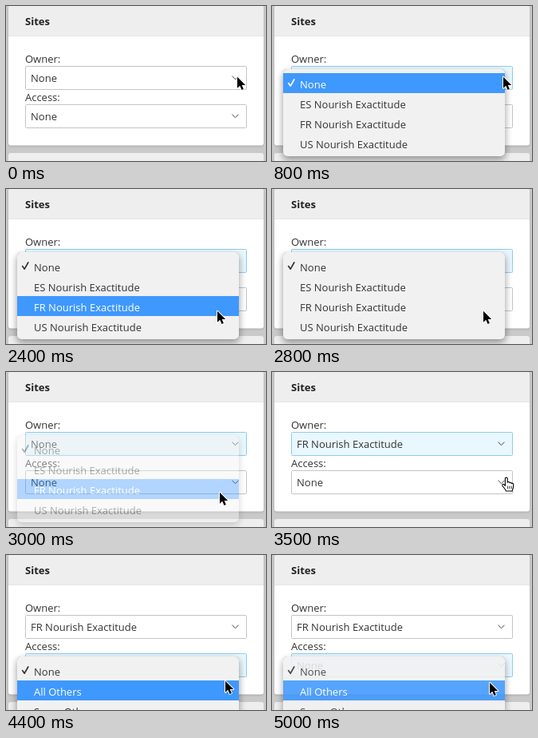
Recreate the animation shown at these times as an HTML page. Size 326 by 194 pixels, loop 5100 ms.

```html
<!DOCTYPE html>
<html lang="en">
<head>
<meta charset="utf-8">
<title>Sites form</title>
<style>
  html, body { margin: 0; width: 100%; height: 100%; overflow: hidden; background: #c9c9c9; }
  svg { display: block; width: 326px; height: 194px; }
  text { font: 13px "Open Sans", "Noto Sans", sans-serif; fill: #333; white-space: pre; }
  .title { font-weight: 700; fill: #222; }
  .chevron, .check { fill: none; stroke: #333; stroke-linecap: round; stroke-linejoin: round; }
  .chevron { stroke: #444; stroke-width: 1; }
  .check { stroke-width: 1.7; }
  .field { fill: #fff; stroke: #c4c4c4; }
  .focus .field { fill: #e9f7fe; stroke: #8fcde8; }
  .row rect { fill: none; }
  .row.on rect { fill: #3f98fd; }
  .row.on text { fill: #fff; }
  .row.on .check { stroke: #fff; }
  .sheet { fill: #f1f1f1; filter: drop-shadow(0 4px 5px rgba(0, 0, 0, .3)) drop-shadow(0 0 .6px rgba(0, 0, 0, .45)); }
  .panel { filter: drop-shadow(0 1px 1px rgba(0, 0, 0, .16)); }
</style>
</head>
<body>
<svg id="stage" viewBox="0 0 326 194">
  <rect width="326" height="194" fill="#c9c9c9"/>
  <rect class="panel" x="3" y="0" width="320" height="174.5" rx="3" fill="#fff"/>
  <path d="M3 37V3a3 3 0 0 1 3-3H320a3 3 0 0 1 3 3V37Z" fill="#eee"/>
  <path d="M3 37.5H323" stroke="#e6e6e6"/>
  <rect x="3" y="184" width="320" height="30" rx="3" fill="#eee"/>
  <text class="title" x="24" y="24">Sites</text>
</svg>
<script>
const LOOP = 5100, STEP = 100, ROW = 25;
const GROUP = "Nourish Exactitude";
const stage = document.getElementById("stage");

function add(parent, tag, attrs, text) {
  const el = document.createElementNS("http://www.w3.org/2000/svg", tag);
  for (const key in attrs) el.setAttribute(key, attrs[key]);
  if (text) el.textContent = text;
  parent.appendChild(el);
  return el;
}

function makeSelect(label, top) {
  const g = add(stage, "g", {});
  add(g, "text", { x: 24, y: top - 4 }, label);
  add(g, "rect", { class: "field", x: 24.5, y: top + .5, width: 277, height: 29, rx: 1 });
  const value = add(g, "text", { x: 31, y: top + 20 }, "None");
  add(g, "path", { class: "chevron", d: `M283.8 ${top + 13}l3.7 3.7l3.7 -3.7` });
  return { g, value };
}

function makeMenu(top, items) {
  const g = add(stage, "g", {});
  add(g, "rect", { class: "sheet", x: 14, y: top, width: 278, height: items.length * ROW + 9, rx: 5 });
  const rows = items.map((item, i) => {
    const y = top + 5 + i * ROW;
    const row = add(g, "g", { class: "row" });
    add(row, "rect", { x: 14, y, width: 278, height: ROW });
    add(row, "text", { x: 35, y: y + 19 }, item);
    if (!i) add(row, "path", { class: "check", d: `M20.6 ${y + 12.6}l2.6 3.6l4.6 -8.2` });
    return row;
  });
  return { g, rows, top };
}

const owner = makeSelect("Owner:", 75);
const access = makeSelect("Access:", 123);
const ownerMenu = makeMenu(79, ["None", "ES " + GROUP, "FR " + GROUP, "US " + GROUP]);
const accessMenu = makeMenu(127, ["None", "All Others", "Some Others"]);

const arrow = add(stage, "path", {
  d: "M0 .8V14.8L3.3 11.7L5.5 16.9L7.9 15.9L5.7 10.9H10.2Z",
  fill: "#000", stroke: "#fff", "stroke-width": 2, "stroke-linejoin": "round", "paint-order": "stroke"
});
const hand = add(stage, "g", {});
add(hand, "path", {
  d: "M-1.6 9V1.6C-1.6 -.4 1.2 -.4 1.2 1.6V6.2C1.6 5 3.8 5.2 3.9 6.8C4.4 5.9 6.3 6.2 6.4 7.6" +
     "C7 6.9 8.7 7.3 8.7 8.8V11.6C8.7 13.4 7.4 14.6 7.2 17H-.6C-1 14.6 -3.6 13 -5 10.4" +
     "C-5.9 8.8 -4.2 7.8 -3 8.9L-1.6 10.4Z",
  fill: "#fff", stroke: "#000", "stroke-width": 1.1, "stroke-linejoin": "round"
});
add(hand, "path", { d: "M1.4 10.6V14.2M3.8 10.6V14.2M6.2 10.6V14.2", stroke: "#000", "stroke-width": .8 });

// time, x, y of the pointer tip
const path = [
  [0, 290, 88], [1800, 290, 88], [1900, 289, 99], [2000, 287, 111], [2100, 281, 127],
  [2200, 273, 142], [2300, 267, 150], [2400, 265, 152], [2900, 265, 152], [3000, 268, 150],
  [3200, 283, 142], [3300, 289, 137], [3400, 292, 134], [3500, 294, 132], [3600, 295, 132],
  [3700, 294, 131], [3800, 293, 131], [4100, 293, 131], [4200, 289, 138], [4300, 281, 149],
  [4400, 275, 157], [4500, 273.5, 158.5], [4600, 273, 159], [LOOP, 273, 159]
];

function pointerAt(t) {
  const i = path.findIndex(p => p[0] > t);
  const [t0, x0, y0] = path[i - 1], [t1, x1, y1] = path[i];
  const k = (t - t0) / (t1 - t0);
  return { x: x0 + (x1 - x0) * k, y: y0 + (y1 - y0) * k };
}

function showMenu(menu, alpha, y, blink) {
  menu.g.setAttribute("opacity", alpha);
  menu.g.setAttribute("display", alpha ? "inline" : "none");
  const active = blink ? -1 : Math.max(0, Math.floor((y - menu.top - 3) / ROW));
  menu.rows.forEach((row, i) => row.classList.toggle("on", i === active));
}

function draw(time) {
  const t = Math.floor((time % LOOP) / STEP) * STEP;
  const { x, y } = pointerAt(t);
  const within = (from, to) => t >= from && t < to;

  owner.value.textContent = t < 3100 ? "None" : "FR " + GROUP;
  owner.g.classList.toggle("focus", within(800, 3800));
  access.g.classList.toggle("focus", t >= 3800);

  showMenu(ownerMenu, !within(800, 3100) ? 0 : t < 3000 ? 1 : .4, y, within(2800, 2900));
  showMenu(accessMenu, t < 3800 ? 0 : t < 5000 ? 1 : .88, y, within(4800, 4900));

  const pointing = within(3100, 3800);
  arrow.setAttribute("display", pointing ? "none" : "inline");
  hand.setAttribute("display", pointing ? "inline" : "none");
  (pointing ? hand : arrow).setAttribute("transform", `translate(${x} ${y})`);
}

let start;
function tick(now) {
  start ??= now;
  draw(now - start);
  requestAnimationFrame(tick);
}
draw(0);
requestAnimationFrame(tick);
</script>
</body>
</html>
```
